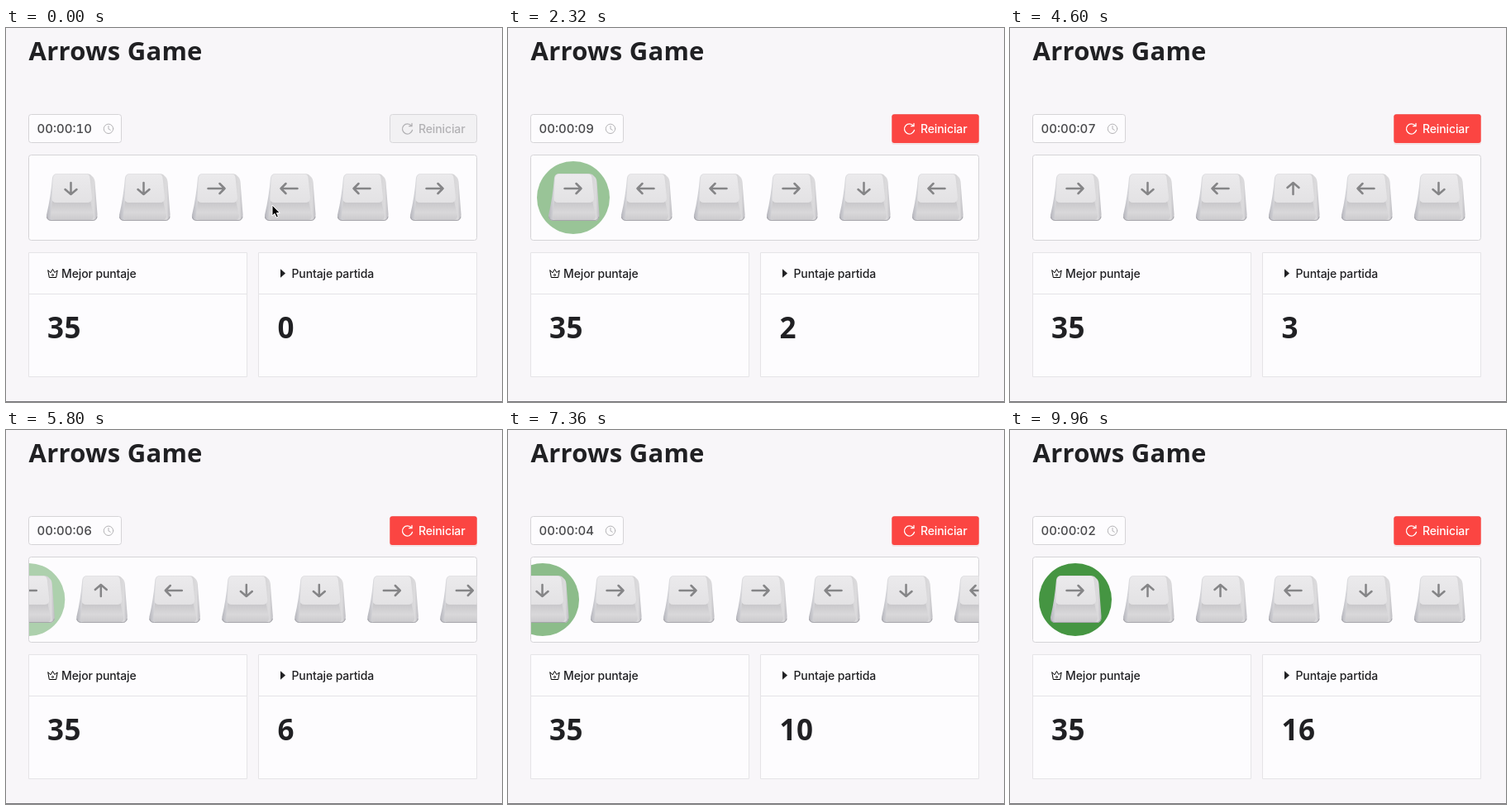
Animation, 600 px wide and 452 px high, one loop 10000 ms. Source, as an HTML page:

```html
<!DOCTYPE html>
<html lang="es">
<head>
<meta charset="utf-8">
<title>Arrows Game</title>
<style>
  html, body { margin: 0; width: 100%; height: 100%; overflow: hidden; background: #f8f6f9; }
  svg { display: block; width: 600px; height: 452px; font: 500 14px Inter, sans-serif; fill: #202023; }
  .panel { fill: #fdfcfe; stroke: #e5e4e7; }
  .field { stroke: #d5d4d7; }
  .line { fill: none; stroke: currentColor; stroke-linecap: round; stroke-linejoin: round; }
  .label { letter-spacing: -.12px; }
  .score, #title { font-family: "Noto Sans", sans-serif; font-weight: 800; }
  .score { font-size: 35px; letter-spacing: .5px; }
  #title { font-size: 31px; font-weight: 700; letter-spacing: .25px; }
  #timer { font-size: 15px; font-variant-numeric: tabular-nums; fill: #48484b; }
</style>
</head>
<body>
<svg viewBox="0 0 600 452">
  <defs>
    <linearGradient id="body">
      <stop offset="0" stop-color="#b4b4bb"/><stop offset=".13" stop-color="#dddde0"/>
      <stop offset=".85" stop-color="#d6d5d7"/><stop offset=".93" stop-color="#dcdbdd"/>
      <stop offset="1" stop-color="#bdbcc1"/>
    </linearGradient>
    <linearGradient id="front" x1="0" y1="0" x2="0" y2="1">
      <stop offset="0" stop-color="#c6c5c8"/><stop offset=".6" stop-color="#d9d8da"/>
      <stop offset="1" stop-color="#cbcacd"/>
    </linearGradient>
    <linearGradient id="face" x1="0" y1="0" x2="0" y2="1">
      <stop offset="0" stop-color="#ebeaec"/><stop offset="1" stop-color="#e3e2e4"/>
    </linearGradient>
    <clipPath id="window"><rect x="28" y="154" width="541.5" height="102.5" rx="2"/></clipPath>
    <g id="cap">
      <path fill="url(#body)" d="M-17-29H18Q23-29 25-26Q28-24 28.500-19L31.500 20Q32 28 26 28H-24Q-31 28-30 21Q-25 0-23-24Q-22-29-17-29Z"/>
      <path fill="url(#front)" d="M-23 4H23L27 22Q27 27 22 27H-20Q-26 27-25 22Z"/>
      <path fill="none" stroke="#a6a5ab" d="M-29.500 23Q-29 27.500-24 27.500H26Q30 27.500 31 23"/>
      <path fill="url(#face)" d="M-17-28.500H18Q22-28.500 22.500-24L25 0Q25 6 19 6H-18Q-24 6-23.500 0L-22-24Q-21-28.500-17-28.500Z"/>
    </g>
    <g id="reload" class="line" stroke-width="1.3">
      <path d="M490.400 118.200A6.100 6.100 0 1 0 491.500 123.500M491 115.500V118.700H487.700"/>
    </g>
  </defs>

  <text id="title" x="27.500" y="38.500">Arrows Game</text>

  <rect class="panel field" x="27.500" y="104.500" width="112" height="34" rx="3"/>
  <text id="timer" x="37.500" y="127"></text>
  <g class="line" color="#b5b4b7"><circle cx="124" cy="121.800" r="5.700"/><path d="M124 118.500V122L126.300 123.300"/></g>

  <g color="#b2b1b4">
    <rect x="464.500" y="104.500" width="105" height="34" rx="3" fill="#f2f1f3" stroke="#d7d6d9"/>
    <use href="#reload"/><text class="label" x="499" y="127" fill="currentColor">Reiniciar</text>
  </g>
  <g id="active" color="#fff">
    <rect x="464" y="106" width="106" height="35" rx="3" fill="#f2e3e5"/>
    <rect x="464.300" y="104.300" width="105.400" height="34.600" rx="3" fill="#fb4542"/>
    <use href="#reload"/><text class="label" x="499" y="127" fill="currentColor">Reiniciar</text>
  </g>

  <rect class="panel field" x="27.500" y="153.500" width="542" height="103" rx="3"/>
  <g clip-path="url(#window)"><g id="strip"><circle id="halo" cy="205" r="44"/></g></g>

  <path class="panel" d="M27.500 271.500H291.500V421.500H27.500ZM27.500 321.500H291.500M305.500 271.500H569.500V421.500H305.500ZM305.500 321.500H569.500"/>
  <g class="line">
    <path d="M50.800 293L52.300 301.500H60.700L62.200 293L58.800 295.500L56.500 291.500L54.200 295.500Z"/><circle cx="56.500" cy="298.500" r="1"/>
  </g>
  <text class="label" x="67" y="301.500">Mejor puntaje</text>
  <path d="M332 291.300L338 296.500L332 301.700Z"/>
  <text class="label" x="345.500" y="301.500">Puntaje partida</text>
  <text class="score" x="50" y="375">35</text>
  <text class="score" id="score" x="328.500" y="375"></text>

  <path id="cursor" fill="#000" stroke="#fff" d="M0 0V13L3 10.300L5.200 15L7.400 14L5.400 9.500H9.300Z"/>
  <path fill="#77767a" d="M0 451H600V452H0Z"/>
</svg>
<script>
const LOOP = 10000, PITCH = 88, FADE = 80, HOLD = 100, SLIDE = 240;
const sequence = "DDRLLRDLULDDRRRLDLRUULDD";
const presses = [1180, 1800, 2280, 3780, 4250, 4660, 5100, 5570, 5910, 6500,
                 6830, 7151, 7640, 7970, 8296, 8700, 9140, 9530, 9885];
const MISTAKE = 3020, PENALTY = 2, FIRST_TICK = 2110;
const arrows = {
  R: "M-10 0H10M4-6L10 0L4 6",
  L: "M10 0H-10M-4-6L-10 0L-4 6",
  D: "M0-7V7M-7 1L0 7L7 1",
  U: "M0 7V-7M-7-1L0-7L7-1"
};
const $ = id => document.getElementById(id);
const clamp = v => Math.max(0, Math.min(1, v));
const ease = p => p < .5 ? 2 * p * p : 1 - 2 * (1 - p) ** 2;

$("strip").insertAdjacentHTML("beforeend", [...sequence].map((dir, i) =>
  `<g transform="translate(${79 + i * PITCH} 205)"><use href="#cap"/>
   <path class="line" color="#858587" stroke-width="2.500" transform="translate(-.5 -11)" d="${arrows[dir]}"/></g>`).join(""));

function drawCursor(t) {
  const [x, y] = t < 40 ? [322, 214] : t < 240 ? [321, 213] : t < 280 ? [316, 300] : [311, 416];
  $("cursor").setAttribute("transform", `translate(${x} ${y})`);
  $("cursor").style.display = t < 320 ? "" : "none";
}

function drawKeys(t) {
  const started = presses.filter(p => p <= t).length;
  const current = Math.max(0, started - 1);
  const age = t - presses[current];
  const missAge = t - MISTAKE;
  const missed = missAge >= 0 && missAge < HOLD + SLIDE;
  const progress = a => ease(clamp((a - HOLD) / SLIDE));
  const glow = a => clamp(a / FADE) * (1 - progress(a));
  const slide = progress(age);

  $("strip").setAttribute("transform", `translate(${-(current + slide) * PITCH} 0)`);
  $("halo").setAttribute("cx", 79 + (missed ? current + 1 : current) * PITCH);
  $("halo").setAttribute("fill", missed ? "#e53935" : "#3c9038");
  $("halo").setAttribute("opacity", glow(missed ? missAge : age));
  const hits = presses.filter(p => p + HOLD <= t).length;
  $("score").textContent = hits - (missAge >= HOLD ? PENALTY : 0);
}

function draw() {
  const t = performance.now() % LOOP;
  const ticks = Math.max(0, Math.floor((t - FIRST_TICK) / 1000) + 1);
  $("timer").textContent = "00:00:" + String(10 - ticks).padStart(2, "0");
  $("active").setAttribute("opacity", clamp((t - presses[0]) / 200));
  drawCursor(t);
  drawKeys(t);
  requestAnimationFrame(draw);
}
draw();
</script>
</body>
</html>
```
